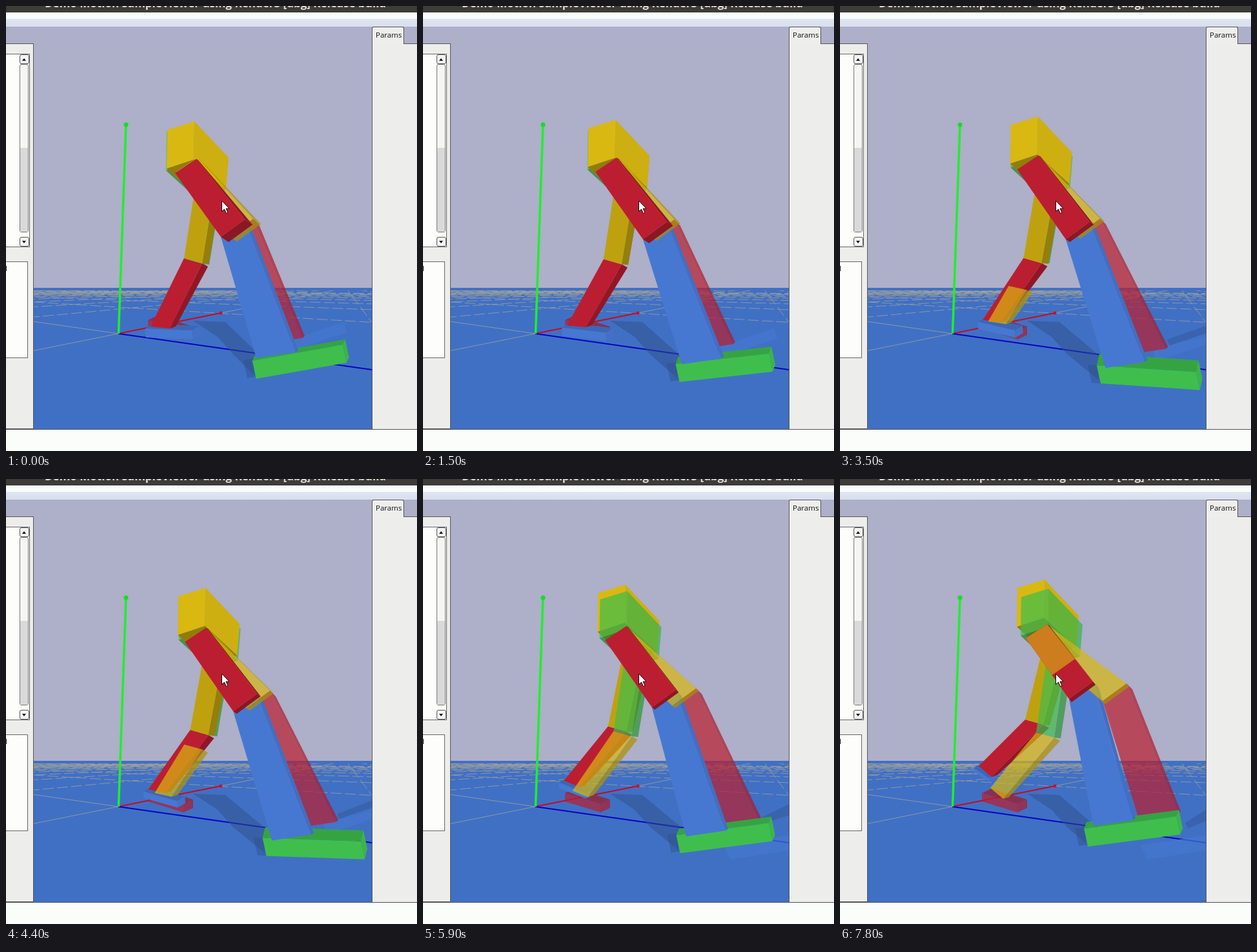
Animation, 637 px wide and 690 px high, one loop 8 s. Source, as an HTML page with a canvas:

```html
<!DOCTYPE html>
<html lang="en">
<head>
<meta charset="utf-8">
<title>Walker simulation</title>
<style>
html, body { margin: 0; width: 100%; height: 100%; overflow: hidden; background: #fbfdfa; }
#stage { position: relative; width: 637px; height: 690px; overflow: hidden; background: #aeafc8; }
#stage > *, .list > * { position: absolute; box-sizing: border-box; }
canvas { left: 0; top: 0; }
.title { left: 0; top: 0; width: 637px; height: 10px; background: #3d3c38; overflow: hidden; }
.title span { position: absolute; left: 60px; top: -15px; font: bold 17px/22px "Open Sans", sans-serif; color: #dfdbd2; white-space: nowrap; }
.menu { left: 0; top: 10px; width: 637px; height: 22px; background: linear-gradient(#f8fcfa 0 10px, #dfe5f1 10px, #d9dfec); }
.panel { top: 58px; background: #edeeeb; border: 1px solid #55555a; }
.left { left: -2px; width: 45px; height: 598px; }
.right { left: 567px; width: 80px; height: 599px; }
.tab { left: 567px; top: 32px; width: 50px; height: 27px; background: #eeeeec; border: 1px solid #55555a; border-bottom: 0; border-radius: 3px 3px 0 0; font: 11.5px/23px "Open Sans", sans-serif; color: #111; padding-left: 5px; }
.list { background: #fdfefb; border: 1px solid #66666a; }
.tree { left: -2px; top: 74px; width: 39px; height: 300px; }
.note { left: -2px; top: 396px; width: 36px; height: 150px; font: 11px/20px "Open Sans", sans-serif; }
.track { left: 22px; top: 15px; width: 14px; height: 261px; background: #f5f5f3; border: 1px solid #77777a; border-radius: 3px; }
.thumb { left: 23px; top: 145px; width: 12px; height: 130px; background: #d9d9d9; }
.btn { left: 22px; width: 15px; height: 15px; border: 1px solid #55555a; border-radius: 3px; background: #f4f4f2; }
.btn::after { content: ""; position: absolute; left: 3px; top: 5px; border: 3.5px solid transparent; border-top: 0; border-bottom: 4px solid #111; }
.down::after { transform: scaleY(-1); }
.status { left: 0; top: 656px; width: 637px; height: 34px; background: #fbfdfa; border-top: 1px solid #55555a; }
</style>
</head>
<body>
<div id="stage">
  <canvas id="view" width="637" height="690"></canvas>
  <div class="title"><span>Demo Motion SampleViewer using Render3 [dbg] Release build</span></div>
  <div class="menu"></div>
  <div class="panel left"></div>
  <div class="panel right"></div>
  <div class="tab">Params</div>
  <div class="list tree">
    <div class="track"></div><div class="thumb"></div>
    <div class="btn" style="top:0"></div><div class="btn down" style="top:283px"></div>
  </div>
  <div class="list note">l</div>
  <div class="status"></div>
</div>
<script>
const ctx = document.getElementById('view').getContext('2d');
const LOOP = 8000, STEPS = 40, HORIZON = 437, GHOST = 0.7;
const YELLOW = '#d9b812', OCHRE = '#bfa10f', RED = '#bb1e30', BLUE = '#4678d2', GREEN = '#3fbe4e', SHADOW = '#30508c';

// The simulation runs in bursts of steps: [first ms, last ms, count]
const bursts = [[400, 1200, 6], [1500, 2500, 7], [2700, 2700, 1], [3000, 3900, 6], [4100, 4100, 1],
  [4400, 5300, 6], [5600, 6500, 6], [6700, 7600, 6], [7800, 7800, 1]];
const times = bursts.flatMap(([a, b, n]) => Array.from({ length: n }, (_, i) =>
  Math.floor((a + (b - a) * i / Math.max(1, n - 1)) / 100 + 0.3) * 100));

const sum = (a, b) => [a[0] + b[0], a[1] + b[1]];
const mix = (a, b, k) => [a[0] + (b[0] - a[0]) * k, a[1] + (b[1] - a[1]) * k];

// Parabola through start, middle and end
const path = (a, b, c) => u => [0, 1].map(i =>
  a[i] * 2 * (u - 0.5) * (u - 1) + b[i] * 4 * u * (1 - u) + c[i] * 2 * u * (u - 0.5));

const solid = {
  torso: path([250, 192], [266, 183], [275, 169]),
  hip: path([262, 259], [276, 253], [288, 247]),
  knee: path([333, 358], [351, 361], [355, 341]),
  ankle: path([388, 546], [412, 561], [393, 538]),
  farHip: path([291, 295], [303, 288], [311, 275]),
  farKnee: path([276, 391], [285, 390], [287, 373]),
  farAnkle: path([224, 497], [221, 484], [215, 445])
};
const ghost = {
  torso: path([249, 195], [267, 190], [281, 183]),
  hip: path([264, 257], [278, 255], [294, 252]),
  knee: path([346, 357], [369, 356], [407, 344]),
  ankle: path([398, 524], [447, 541], [463, 527]),
  farHip: path([291, 297], [304, 288], [320, 280]),
  farKnee: path([277, 392], [288, 390], [304, 393]),
  farAnkle: path([226, 498], [230, 488], [233, 479])
};
const thighDepth = path([12, 8], [6, 4], [4, 5]);
const farAnkleEdge = path([30, 3], [27, 5], [20, 17]);
const farFootEdge = path([72, 3], [55, 14], [24, 16]);
const farFootHeight = path([1, 14], [1, 11], [1, 6]);
const streak = path([470, 510], [510, 518], [535, 533]);

function fill(points, color, alpha = 1) {
  ctx.globalAlpha = alpha;
  ctx.fillStyle = color;
  ctx.beginPath();
  for (const p of points) ctx.lineTo(...p);
  ctx.closePath();
  ctx.fill();
  ctx.globalAlpha = 1;
}

const area = pts => pts.reduce((t, p, i) => {
  const q = pts[(i + 1) % pts.length];
  return t + p[0] * q[1] - q[0] * p[1];
}, 0);

// A box: near face a-b with edges ea and eb, far face shifted by da and db
function box(a, b, ea, eb, da, db, shades = [0.14, 0.22, 0.25, 0.2]) {
  const front = [a, sum(a, ea), sum(b, eb), b];
  const back = front.map((p, i) => sum(p, i < 2 ? da : db));
  const sides = front.map((p, i) => {
    const j = (i + 1) % 4;
    return { pts: [p, back[i], back[j], front[j]], shade: shades[i] };
  }).filter(side => area(side.pts) > 0);
  return { front, sides };
}

function paint({ front, sides }, color, alpha = 1) {
  for (const { pts, shade } of sides) {
    fill(pts, color, alpha);
    fill(pts, '#000', alpha * shade);
  }
  fill(front, color, alpha);
}

function robot(joints, u) {
  const at = name => joints[name](u);
  const torso = at('torso'), ankle = farAnkleEdge(u);
  const kneeEdge = [37, -27], farEdge = [28, 8];
  return {
    torso: box(torso, sum(torso, [-1, 60]), [42, -13], [42, -14], [53, 56], [50, 46], [0.1, 0.05, 0.33, 0.1]),
    thigh: box(at('hip'), at('knee'), [33, -22], kneeEdge, [3, 2], thighDepth(u)),
    shin: box(at('knee'), at('ankle'), kneeEdge, [61, -9], [9, 9], [4, -3], [0.1, 0.08, 0.1, 0.1]),
    farThigh: box(at('farHip'), at('farKnee'), [28, 12], farEdge, [8, 18], [10, 1]),
    farShin: box(at('farKnee'), at('farAnkle'), farEdge, ankle, [9, 5], [9, -3]),
    ankle: at('ankle'), farAnkle: at('farAnkle')
  };
}

function slab(a, edge, height, depth) {
  return box(a, sum(a, height), edge, edge, depth, depth, [0.14, 0.05, 0.1, 0.1]);
}

// The leading foot rocks from heel to toe and back
function leadFoot(step) {
  const rock = Math.cos((step - 18) / 17 * Math.PI);
  const angle = (-3.2 + 7 * rock) * Math.PI / 180, length = 148 + 6 * rock;
  const heel = [398 - 0.045 * (step - 19) ** 2, path([550, 550], [557, 557], [542, 542])(step / STEPS)[1]];
  const edge = [length * Math.cos(angle), length * Math.sin(angle)];
  return { heel, body: slab(heel, edge, [6, 28], [4, -13 - 5 * rock]) };
}

function line(x1, y1, x2, y2, color, width) {
  ctx.strokeStyle = color;
  ctx.lineWidth = width;
  ctx.beginPath();
  ctx.moveTo(x1, y1);
  ctx.lineTo(x2, y2);
  ctx.stroke();
}

function dot(x, y, r, color) {
  ctx.fillStyle = color;
  ctx.beginPath();
  ctx.arc(x, y, r, 0, 7);
  ctx.fill();
}

// Lines run to two vanishing points and cross y = 508 at even spacing
function grid() {
  ctx.save();
  ctx.beginPath();
  ctx.rect(43, HORIZON + 4, 524, 215);
  ctx.clip();
  for (const [vx, gap] of [[527, 406], [-324, 684]])
    for (let n = -10; n <= 10; n++) {
      const x = 174 + n * gap;
      ctx.setLineDash(n === 0 ? [] : [17, 5]);
      ctx.lineDashOffset = n * n * 7;
      line(vx, HORIZON, vx + (x - vx) * 3, HORIZON + 213, 'rgba(164,163,152,.75)', 1);
    }
  ctx.restore();
}

function scenery() {
  ctx.fillStyle = '#aeafc8';
  ctx.fillRect(0, 0, 637, 690);
  ctx.fillStyle = '#4070c4';
  ctx.fillRect(43, HORIZON, 524, 220);
  grid();
  line(174, 508, 333, 476, '#c80a1e', 2);
  dot(333, 476, 2.5, '#d80a1a');
  line(174, 508, 567, 564, '#0404c4', 2);
  line(174.5, 508, 186, 184, '#1cf02c', 3.5);
  dot(186, 184, 3.5, '#12e020');
}

function shadows(u, foot) {
  const { heel, body } = foot;
  fill([[290, 488], [340, 490], sum(heel, [8, -12]), sum(heel, [2, 22]), [352, 540], [328, 513]], SHADOW, 0.5);
  fill(body.front.map(p => sum(p, [-14, -1])), SHADOW, 0.45);
  if (u > 0.25) {
    const a = streak(u);
    fill([a, [570, a[1] - 22], [570, a[1] - 4], sum(a, [4, 9])], SHADOW, 0.4);
  }
}

function farLeg(u, real, twin, twinAhead) {
  paint(slab([220, 487], [55, 17], [0, 13], [15, -7]), RED, GHOST);
  paint(slab(sum(real.farAnkle, [-8, 3]), farFootEdge(u), farFootHeight(u), [12, -7]), BLUE);
  paint(real.farShin, RED);

  // The twin's shin comes through from the ankle upwards
  const bare = 1 - Math.min(1, Math.max(0, (u - 0.2) / 0.45));
  if (bare < 1) {
    const [a, b, c, d] = twin.farShin.front;
    const top = mix(a, d, bare), edge = mix(b, c, bare);
    paint(box(top, d, sum(edge, [-top[0], -top[1]]), sum(c, [-d[0], -d[1]]), [9, 5], [9, -3]), YELLOW, GHOST);
  }
  if (!twinAhead) paint(twin.farThigh, GREEN, GHOST);
  paint(real.farThigh, OCHRE);
  if (twinAhead) paint(twin.farThigh, GREEN, GHOST);
}

function nearLeg(u, real, twin, foot) {
  if (u < 0.7) paint(slab(sum(twin.ankle, [42, -6]), [84, -28], [4, 16], [0, 0]), BLUE, GHOST);
  else paint(slab([466, 568], [110, -17], [10, 22], [0, 0]), BLUE, GHOST);
  paint(twin.shin, RED, GHOST);
  paint(foot.body, GREEN);
  paint(real.shin, BLUE);
}

function upperBody(u, real, twin, twinAhead) {
  if (!twinAhead) paint(twin.torso, GREEN, GHOST);
  paint(real.torso, YELLOW);
  if (twinAhead) {
    if (u > 0.7) paint(twin.torso, GREEN, GHOST);
    else fill(twin.torso.sides[0].pts, GREEN, GHOST);
  }
  paint(twin.thigh, YELLOW, GHOST);
  paint(real.thigh, RED);
  const cover = 2.7 * (u - 0.775);
  if (cover > 0) {
    const [a, b, c, d] = real.thigh.front;
    fill([a, b, mix(b, c, cover), mix(a, d, cover)], YELLOW, 0.62);
  }
}

function cursor() {
  fill([[334.5, 302], [334.5, 318.5], [338.5, 315], [341.5, 321.5], [344, 320.5], [341, 314], [346, 314]], '#fff');
  ctx.strokeStyle = '#111';
  ctx.lineWidth = 1;
  ctx.stroke();
}

function draw(ms) {
  const step = times.filter(t => t <= ms).length, u = step / STEPS;
  const real = robot(solid, u), twin = robot(ghost, u), foot = leadFoot(step);
  const twinAhead = u > 0.62;
  scenery();
  shadows(u, foot);
  farLeg(u, real, twin, twinAhead);
  nearLeg(u, real, twin, foot);
  upperBody(u, real, twin, twinAhead);
  cursor();
}

const start = performance.now();
function tick() {
  draw((performance.now() - start) % LOOP);
  requestAnimationFrame(tick);
}
tick();
</script>
</body>
</html>
```
